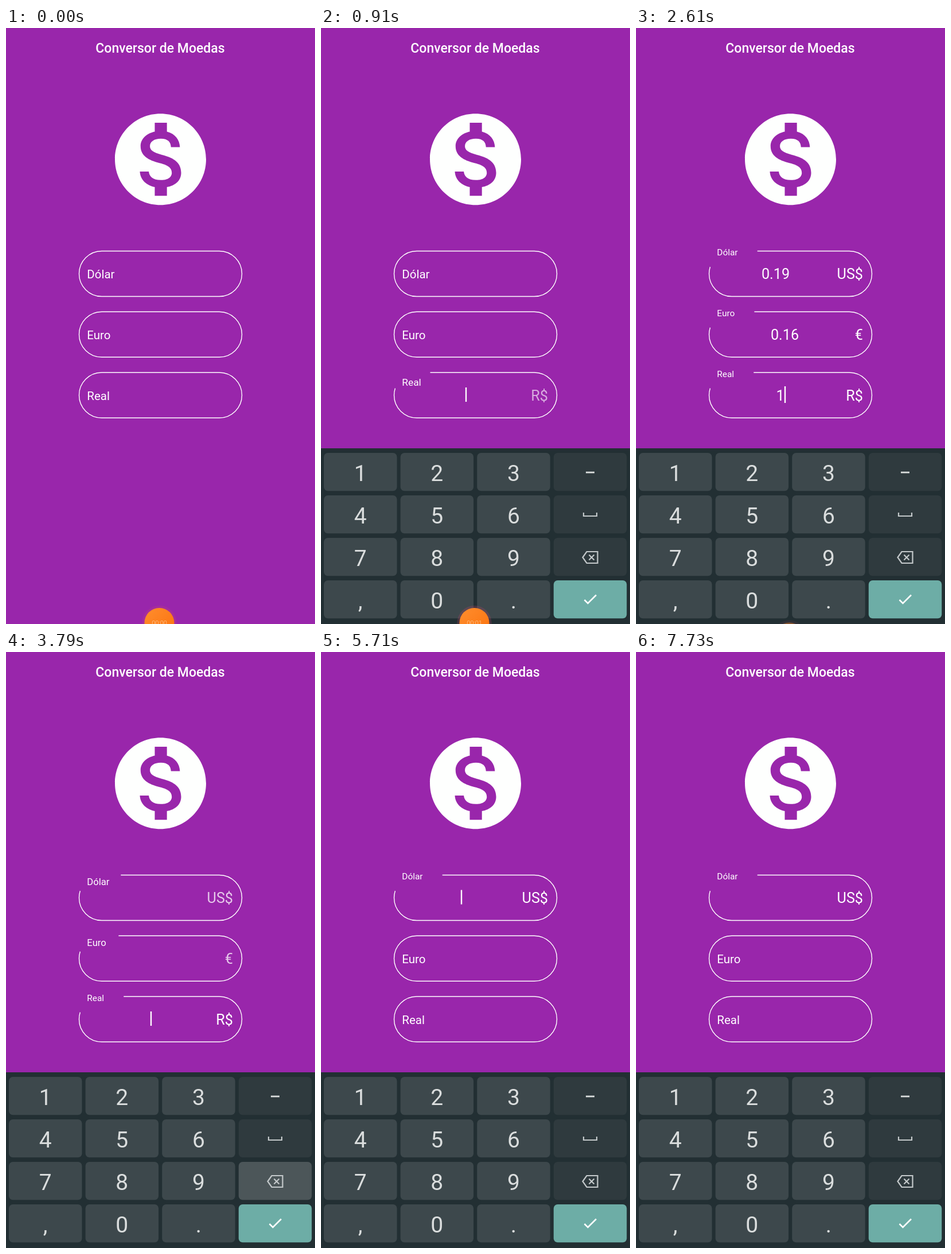
Animation of 539 by 1038 pixels, one loop 8000 ms. Source, as an HTML page with a canvas:

```html
<!DOCTYPE html>
<html lang="pt">
<head>
<meta charset="utf-8">
<title>Conversor de Moedas</title>
<style>
html, body { margin: 0; width: 100%; height: 100%; overflow: hidden; background: #9926ab; }
canvas { display: block; width: 539px; height: 1038px; }
</style>
</head>
<body>
<canvas id="stage" width="539" height="1038"></canvas>
<script>
const ctx = document.getElementById('stage').getContext('2d');
const LOOP = 8000;
const ROBOTO = 'Roboto, sans-serif';
const PURPLE = '#9926ab', BOARD = '#222f33', KEY = '#3d484c', KEY_DARK = '#2f3a3e';
const GLYPH = '#dadddd', GLYPH_DIM = '#c3c8ca';

const coin = new Path2D('M12 2C6.48 2 2 6.48 2 12s4.48 10 10 10 10-4.48 10-10S17.52 2 12 2z' +
  'm1.41 16.09V20h-2.67v-1.93c-1.71-.36-3.16-1.46-3.27-3.4h1.96c.1 1.05.82 1.87 2.65 1.87' +
  ' 1.96 0 2.4-.98 2.4-1.59 0-.83-.44-1.61-2.67-2.14-2.48-.6-4.18-1.62-4.18-3.67' +
  ' 0-1.72 1.39-2.84 3.11-3.21V4h2.67v1.95c1.86.45 2.79 1.86 2.85 3.39H14.3' +
  'c-.05-1.11-.64-1.87-2.22-1.87-1.5 0-2.4.68-2.4 1.64 0 .84.65 1.39 2.67 1.91' +
  's4.18 1.39 4.18 3.91c-.01 1.83-1.38 2.83-3.12 3.16z');

// floats: times at which the label rises, falls, rises again...
// values: [from, to, text]
const fields = [
  { label: 'Dólar', suffix: 'US$', y: 428, mid: 243.5, floats: [1760, 3790, 4750],
    values: [[1760, 3790, '0.19'], [5800, 7230, '1']] },
  { label: 'Euro', suffix: '€', y: 533.75, mid: 259.5, floats: [1760, 3790, 5800, 7230],
    values: [[1760, 3790, '0.16'], [5800, 7230, '0.82']] },
  { label: 'Real', suffix: 'R$', y: 639.5, mid: 251.5, floats: [880, 4750, 5800, 7230],
    values: [[1760, 3790, '1'], [5800, 7230, '5.16']] }
];
const cursorOn = [[640, 1140], [1440, 2270], [2560, 3100], [3440, 4160],
  [4520, 5080], [5440, 6270], [6560, 6900], [7230, 7720]];
const presses = [['1', 1660], ['back', 3735], ['1', 5715], ['back', 7155]];
const FOCUS_SWITCH = 4750, BOARD_IN = 700, BOARD_SWAP = 860;

const clamp = v => Math.max(0, Math.min(1, v));
const mix = (a, b, p) => a + (b - a) * p;
const within = (t, [a, b]) => t >= a && t < b;

// cubic-bezier(.4, 0, .2, 1)
function ease(x) {
  if (x <= 0) return 0;
  if (x >= 1) return 1;
  let lo = 0, hi = 1, s = .5;
  for (let i = 0; i < 20; i++) {
    s = (lo + hi) / 2;
    const bx = 1.2 * (1 - s) ** 2 * s + .6 * (1 - s) * s * s + s ** 3;
    if (bx < x) lo = s; else hi = s;
  }
  return 3 * (1 - s) * s * s + s ** 3;
}

function text(str, x, y, size, color, align = 'left', font = ROBOTO, weight = 400) {
  ctx.font = `${weight} ${size}px ${font}`;
  ctx.textAlign = align;
  ctx.fillStyle = color;
  ctx.fillText(str, x, y);
}

function box(x, y, w, h, color, r = 7) {
  ctx.fillStyle = color;
  ctx.beginPath();
  ctx.roundRect(x, y, w, h, r);
  ctx.fill();
}

function disc(x, y, r, color) {
  ctx.fillStyle = color;
  ctx.beginPath();
  ctx.arc(x, y, r, 0, 7);
  ctx.fill();
}

function line(points, color, width = 2.2, close = false) {
  ctx.strokeStyle = color;
  ctx.lineWidth = width;
  ctx.beginPath();
  for (let i = 0; i < points.length; i += 2) ctx.lineTo(points[i], points[i + 1]);
  if (close) ctx.closePath();
  ctx.stroke();
}

function header() {
  text('Conversor de Moedas', 269, 42.5, 23, '#fff', 'center', ROBOTO, 500);
  ctx.save();
  ctx.translate(269.5 - 12 * 7.95, 228.7 - 12 * 7.95);
  ctx.scale(7.95, 7.95);
  ctx.fillStyle = '#fefffe';
  ctx.fill(coin, 'evenodd');
  ctx.restore();
}

function floatAt(f, t) {
  const n = f.floats.filter(s => t >= s).length;
  if (!n) return 0;
  const e = ease((t - f.floats[n - 1] + 50) / 200);
  return n % 2 ? e : 1 - e;
}

function outline(f, p) {
  const r = 39.5, left = 167, right = 372, top = f.y - r;
  ctx.font = `15.4px ${ROBOTO}`;
  const gapEnd = 166 + p * (ctx.measureText(f.label).width + 9.5);
  ctx.strokeStyle = '#fff';
  ctx.lineWidth = 1.4;
  ctx.beginPath();
  ctx.moveTo(p > 0 ? gapEnd : left, top);
  ctx.lineTo(right, top);
  ctx.arc(right, f.y, r, -Math.PI / 2, Math.PI / 2);
  ctx.lineTo(left, f.y + r);
  ctx.arc(left, f.y, r, Math.PI / 2, p > 0 ? Math.PI + .308 : Math.PI * 1.5);
  ctx.stroke();
}

function field(f, t, focused) {
  const p = floatAt(f, t);
  outline(f, p);
  text(f.label, 141.3, mix(f.y + 8, f.y - 31.8, p), mix(20.5, 15.4, p), '#fff');
  ctx.globalAlpha = p;
  text(f.suffix, 396, f.y + 9, 25.2, '#fff', 'right');
  ctx.globalAlpha = 1;
  const entry = f.values.find(v => within(t, v));
  const value = entry ? entry[2] : '';
  if (value) text(value, f.mid, f.y + 9, 25.2, '#fff', 'center');
  if (focused && cursorOn.some(s => within(t, s))) {
    const h = value ? 29 : 25;
    const x = f.mid + 1.5 + (value ? 7 : 0);
    ctx.fillStyle = '#fff';
    ctx.fillRect(x - 1.2, f.y - 1 - h / 2, 2.4, h);
  }
}

function backspace(x, y, color) {
  line([x - 13, y, x - 6, y - 10, x + 13, y - 10, x + 13, y + 10, x - 6, y + 10], color, 2.2, true);
  line([x - 2, y - 4.5, x + 7, y + 4.5], color);
  line([x + 7, y - 4.5, x - 2, y + 4.5], color);
}

function pressGlow(key, t) {
  return Math.max(0, ...presses.filter(q => q[0] === key).map(([, s]) =>
    t < s ? 0 : clamp((t - s) / 40) * (1 - clamp((t - s - 120) / 200))));
}

function numberPad(t) {
  ctx.fillStyle = BOARD;
  ctx.fillRect(0, 732, 539, 420);
  const rows = [['1', '2', '3', 'dash'], ['4', '5', '6', 'space'],
    ['7', '8', '9', 'back'], [',', '0', '.', 'done']];
  rows.forEach((row, r) => row.forEach((key, c) => {
    const x = 5 + c * 133.6, y = 740 + r * 74, cx = x + 63.7, cy = y + 33;
    const color = key === 'done' ? '#6dada6' : c === 3 ? KEY_DARK : KEY;
    box(x, y, 127.5, 66.3, color);
    const glow = pressGlow(key, t);
    if (glow) box(x, y, 127.5, 66.3, `rgba(255,255,255,${.14 * glow})`);
    if (c < 3) text(key, cx, y + 48.5, 39, GLYPH, 'center');
    else if (key === 'dash') line([cx - 7.5, 774, cx + 7.5, 774], GLYPH, 2.8);
    else if (key === 'space') line([cx - 11.5, 844, cx - 11.5, 850, cx + 11.5, 850, cx + 11.5, 844], GLYPH_DIM);
    else if (key === 'back') backspace(cx, cy + 1, GLYPH_DIM);
    else line([cx - 10, 996, cx - 4, 1002, cx + 10.5, 987.5], '#fff', 2.6);
  }));
}

function letterBoard(top) {
  ctx.save();
  ctx.translate(0, top);
  ctx.fillStyle = BOARD;
  ctx.fillRect(0, 0, 539, 400);
  disc(31, 27.5, 19.2, '#eceef0');
  line([28, 21, 34.5, 27.5, 28, 34], BOARD, 2.6);
  box(510, 15, 8, 16, GLYPH_DIM, 4);
  ctx.strokeStyle = GLYPH_DIM;
  ctx.lineWidth = 2.2;
  ctx.beginPath();
  ctx.arc(514, 26, 8.3, 0, Math.PI);
  ctx.moveTo(514, 34);
  ctx.lineTo(514, 40);
  ctx.stroke();

  const rows = [['qwertyuiop', 6], ['asdfghjkl', 32.7], ['zxcvbnm', 86]];
  rows.forEach(([letters, x0], r) => [...letters].forEach((ch, i) => {
    const x = x0 + i * 53.4, y = 64 + r * 75;
    box(x, y, 46.5, 60, KEY);
    text(ch, x + 23.2, y + 39.5, 37, GLYPH, 'center', 'Lato, sans-serif');
    if (r === 0) text((i + 1) % 10, x + 39, y + 16, 14.5, GLYPH_DIM, 'center', ROBOTO, 500);
  }));
  box(6, 214, 73, 60, KEY_DARK);
  box(460, 214, 73, 60, KEY_DARK);
  line([42, 233, 53.5, 245, 47, 245, 47, 255, 37, 255, 37, 245, 30.5, 245], GLYPH_DIM, 2.2, true);
  backspace(496, 244, GLYPH_DIM);
  box(6, 289, 73, 60, KEY_DARK);
  box(139, 289, 260, 60, KEY);
  box(460, 289, 73, 60, KEY_DARK);
  ctx.restore();
}

function keyboard(t) {
  const a = clamp((t - BOARD_IN) / 192);
  if (!a) return;
  ctx.globalAlpha = a;
  const drop = 100 * (1 - a);
  if (t < BOARD_SWAP) letterBoard(738 + drop);
  else {
    ctx.save();
    ctx.translate(0, drop);
    numberPad(t);
    ctx.restore();
  }
  ctx.globalAlpha = 1;
}

function recorder(t) {
  if (t > 3100) return;
  const hide = ease((t - 1000) / 230);
  const y = mix(1036, 1061.5, hide);
  ctx.globalAlpha = t < 2450 ? mix(1, .7, hide) : .4;
  disc(267.5, y, 30, 'rgba(200,70,110,.22)');
  const g = ctx.createLinearGradient(245, y - 24, 290, y + 20);
  g.addColorStop(0, '#ff8c2c');
  g.addColorStop(1, '#fb7410');
  disc(267.5, y, 26, g);
  text(t < 110 ? '00:00' : '00:01', 267.5, y + 4, 11, '#ffd3a4', 'center', ROBOTO, 300);
  ctx.globalAlpha = 1;
}

function draw(t) {
  ctx.fillStyle = PURPLE;
  ctx.fillRect(0, 0, 539, 1038);
  header();
  const focus = t < FOCUS_SWITCH ? 2 : 0;
  fields.forEach((f, i) => field(f, t, i === focus));
  keyboard(t);
  recorder(t);
}

const start = performance.now();
function tick() {
  draw((performance.now() - start) % LOOP);
  requestAnimationFrame(tick);
}
tick();
</script>
</body>
</html>
```
